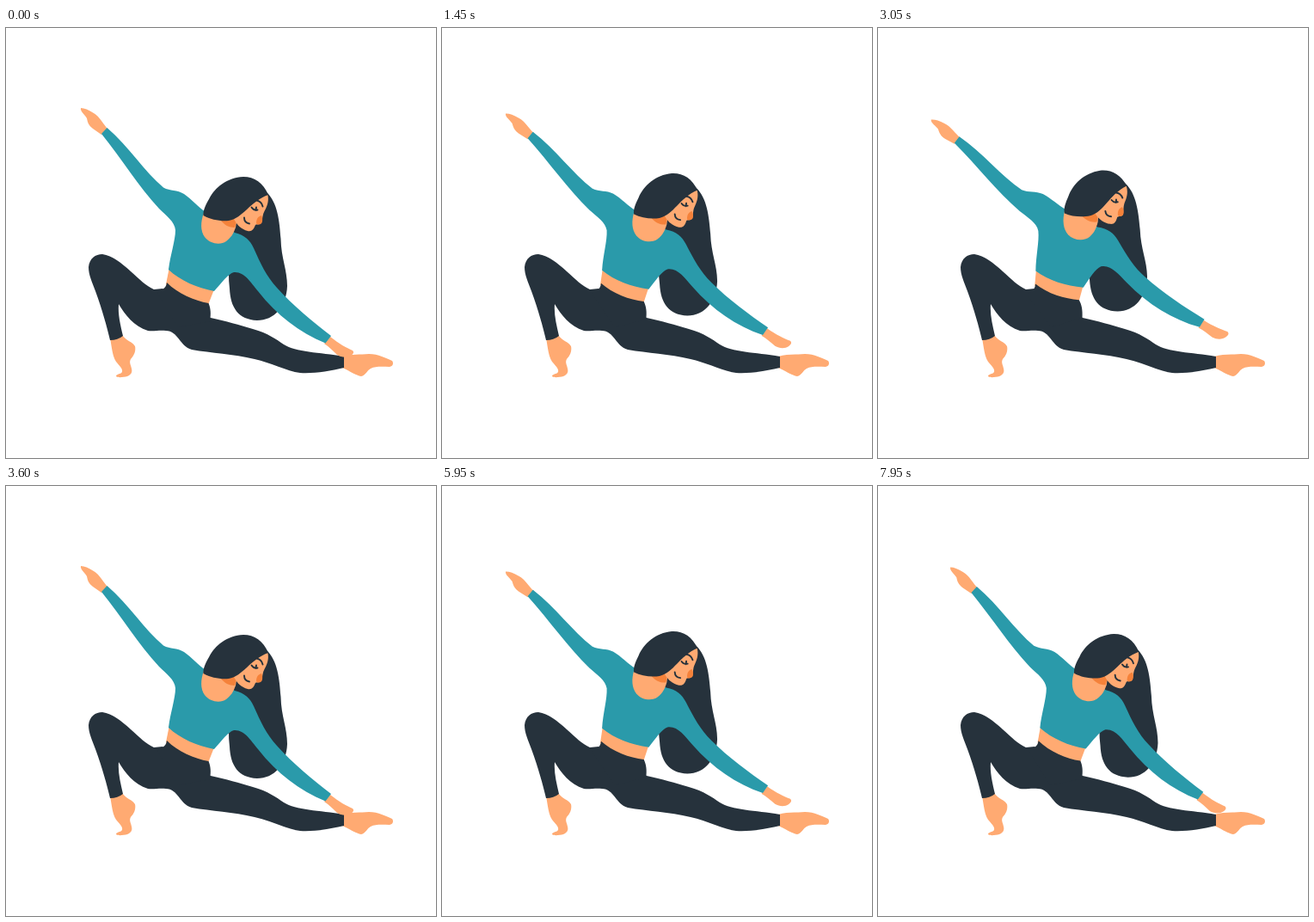
An HTML page for the animation above (8000 ms loop, 500x500 px).

```html
<!DOCTYPE html>
<html lang="en">
<head>
<meta charset="utf-8">
<title>Stretch</title>
<style>
  html, body { margin: 0; width: 100%; height: 100%; overflow: hidden; background: #fff; }
  svg { display: block; width: 100%; height: 100%; }
  .dark { fill: #26323c; }
  .teal { fill: #2a9aaa; }
  .skin { fill: #ffaa72; }
  .blush { fill: #f5823a; }
  .line { fill: none; stroke: #26323c; stroke-width: 1.9; stroke-linecap: round; }
</style>
</head>
<body>
<svg viewBox="0 0 500 500">
  <g id="legs">
    <path class="skin" d="M121 360C123 372 124 382 128 388C132 393 136 396 135 400C133 403 128 402 128 405C130 407 137 406 141 405C146 403 147 400 146 396C145 391 143 389 145 385C150 380 151 374 150 370C146 364 141 365 135 357Z"/>
    <path class="skin" d="M391 382C401 379 412 380 422 379C433 379 442 384 449 387C451 390 450 393 446 394C438 394 430 393 424 396C420 398 418 404 413 405C407 404 400 399 391 395Z"/>
    <path class="dark" d="M121 363C117 346 112 328 104 306C100 295 96 287 96 278C97 268 104 263 112 263C124 265 134 273 145 283C155 292 163 300 172 304L182 303L195 313L238 337C256 341 271 345 287 350C305 355 314 362 323 368C337 377 364 377 393 382L393 395C376 399 358 402 342 401C326 399 308 389 289 385C264 379 239 378 216 374C202 370 200 352 186 352C178 351 172 353 165 352C149 347 138 333 131 321C130 333 133 345 136 358Q130 363 121 363Z"/>
  </g>
  <g id="body">
    <path id="hair" class="dark" d="M270 190L303 191C316 203 318 225 319.500 245C320 268 327 281 327 300C326 324 312 340 292 340C270 339 261 325 260 303C257 280 262 250 262 225Z"/>
    <path class="skin" d="M190 278L186 298L210 320L235 322L242 304Z"/>
    <path class="dark" d="M187 296C200 309 219 317 235.500 320C238 326 238.500 332 237 341L200 348L176 308C180 304 186 304 187 296Z"/>
    <path class="skin" d="M119 118C113 112 109 103 102 99C96 95 91 93 87 93C86 97 92 101 94 105C95 110 96 113 101 117L111 124Z"/>
    <path class="skin" d="M377 359C387 367 396 372 403 375C405 377 404 379 401 381C396 384 390 383 385 380C380 375 376 371 370 367Z"/>
    <path class="teal" d="M117.500 116C143 138 161 167 183 185.500C191 190 199 188 207 193C216 199 223 208 232 214L266 238C278 241 284 247 288 256C296 274 303 289 315 302C333 322 357 342 378 358L371.500 366.500C341 354 315 334 293 306C284 295 277 283 265 284C258 286 251 296 242 306C222 302 203 294 189 281C191 264 197 247 197 235C196 225 187 219 178 210C154 184 135 153 111 123Z"/>
    <path class="skin" d="M230 215C226 226 226 236 231 243C237 251 249 253 256 248C262 243 264 240 267 232L270 215Z"/>
    <path class="blush" d="M250 222L270 218L266 232C259 232 254 229 250 224Z"/>
    <path class="skin" d="M304 193C306 199 304.500 206 301 212C298 217 298.500 222 297 227C294 229 291 228 290 229C288 234 286 237 281 236C274 234 269 230 265 222L285 198Z"/>
    <path class="blush" d="M297 218C299 222 298 226 297 227C295 229 292 229 291 227C291 222 293 219 297 218Z"/>
    <path class="dark" d="M305 194C299 180 289 173 276 173C257 174 243 185 236 199C232 206 229 212 229.500 218C238 223 250 225 259 224C276 221 283 202 305 194Z"/>
    <path class="line" d="M291.500 200.500Q297 201.500 298.500 207.500M285.500 208.500Q288 212.500 292.500 211.500M290.500 212L291 208.500M277 220.500Q277 226.500 283 227.500"/>
  </g>
</svg>
<script>
  const LOOP = 8000, CYCLE = 4500, SWING = 900, STEP = 50;
  const body = document.getElementById('body');
  const hair = document.getElementById('hair');
  const ease = x => x * x * (3 - 2 * x);

  // 0 = leaning to the foot, 1 = raised; two swings, then a rest
  function lift(t) {
    const n = (t % CYCLE) / SWING;
    if (n >= 4) return 0;
    const m = n % 2;
    return ease(m < 1 ? m : 2 - m);
  }

  function draw(now) {
    const t = Math.floor((now % LOOP) / STEP) * STEP;
    const p = lift(t);
    body.setAttribute('transform', `rotate(${-9.3 * p} 200 334)`);
    // the loose hair keeps hanging while the head turns
    hair.setAttribute('transform', `rotate(${8 * p} 306 195)`);
  }

  let start;
  function frame(now) {
    start ??= now;
    draw(now - start);
    requestAnimationFrame(frame);
  }
  draw(0);
  requestAnimationFrame(frame);
</script>
</body>
</html>
```
